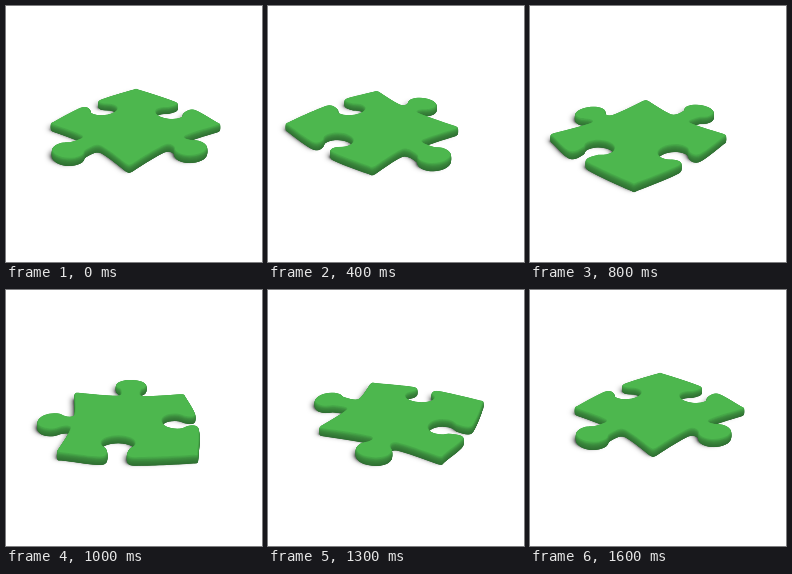
These frames come from a looping animation (256 by 256 pixels, 1.7 s). An HTML page with a canvas:

```html
<!DOCTYPE html>
<html lang="en">
<head>
<meta charset="utf-8">
<title>Turning puzzle piece</title>
<style>
  html, body { margin: 0; width: 100%; height: 100%; overflow: hidden; background: #fff; }
  canvas { display: block; width: 256px; height: 256px; }
</style>
</head>
<body>
<canvas id="stage" width="256" height="256"></canvas>
<script>
const ctx = document.getElementById('stage').getContext('2d');
const STEP = 100, LOOP = 1700, POSES = 16;
const DEPTH = 7.5;

// Sides of the piece on the ground plane (x right, z away), clockwise from back left:
// starting corner, tab (1) or socket (-1), centre of the tab along the side, its reach.
const sides = [
  { from: [-77, 60], sign: 1, shift: -3, reach: 28 },
  { from: [48, 53], sign: 1, shift: 1, reach: 36 },
  { from: [44, -63], sign: -1, shift: -2, reach: 28 },
  { from: [-82, -64], sign: -1, shift: 9, reach: 33 },
];

// One Bezier outline: each entry is [c1, c2, end].
function buildOutline() {
  const curves = [];
  let start;
  sides.forEach(({ from: a, sign, shift, reach }, i) => {
    const b = sides[(i + 1) % 4].from;
    const len = Math.hypot(b[0] - a[0], b[1] - a[1]);
    const u = [(b[0] - a[0]) / len, (b[1] - a[1]) / len];
    const mid = [(a[0] + b[0]) / 2, (a[1] + b[1]) / 2];
    const at = (t, o) => [mid[0] + u[0] * t - u[1] * o * sign, mid[1] + u[1] * t + u[0] * o * sign];
    const e = len / 2 - 4, head = reach - 15;
    // Half a side up to the tip of the tab; dir picks the half.
    const half = dir => [
      [-e * dir, 0], [-len / 3 * dir, -3], [shift - 24 * dir, -6], [shift - 15 * dir, -6],
      [shift - 9 * dir, -6], [shift - 8 * dir, -1], [shift - 11 * dir, head - 9],
      [shift - 13 * dir, head - 6], [shift - 16 * dir, head - 5], [shift - 16 * dir, head + 1],
      [shift - 16 * dir, head + 9], [shift - 9 * dir, reach], [shift, reach],
    ];
    const pts = [...half(1), ...half(-1).reverse().slice(1)].map(p => at(...p));
    if (start) curves.push([a, a, pts[0]]);
    else start = pts[0];
    for (let k = 1; k < pts.length; k += 3) curves.push(pts.slice(k, k + 3));
  });
  const first = sides[0].from;
  curves.push([first, first, start]);
  return { start, curves };
}
const outline = buildOutline();

function trace(angle, drop) {
  const c = Math.cos(angle), s = Math.sin(angle);
  const project = ([x, z]) => {
    const rx = x * c - z * s, rz = x * s + z * c;
    const p = 1 / (1 + rz * 0.00147);
    return [119 + rx * p, 123 + (drop - 0.45 * rz) * p];
  };
  ctx.beginPath();
  ctx.moveTo(...project(outline.start));
  for (const curve of outline.curves) ctx.bezierCurveTo(...curve.flatMap(project));
  ctx.closePath();
}

function castShadow(angle, dx, dy, blur, alpha) {
  ctx.save();
  ctx.shadowColor = `rgba(0,0,0,${alpha})`;
  ctx.shadowBlur = blur;
  ctx.shadowOffsetX = dx;
  ctx.shadowOffsetY = dy;
  trace(angle, DEPTH - 1);
  ctx.fillStyle = '#2f6e33';
  ctx.fill();
  ctx.restore();
}

const low = [46, 108, 49], high = [77, 183, 78];

function draw(pose) {
  const angle = (pose - 6) * 2 * Math.PI / POSES;
  ctx.fillStyle = '#fff';
  ctx.fillRect(0, 0, 256, 256);
  castShadow(angle, -4, -1, 5, 0.5);
  castShadow(angle, -2, 0, 2, 0.5);

  // Stack slices from the floor up; the middle ones swell to round the rim.
  ctx.lineJoin = 'round';
  for (let h = DEPTH; h >= 0; h -= 0.5) {
    const k = 1 - h / DEPTH;
    const mix = 0.5 * k + 0.5 * k ** 5;
    const color = `rgb(${low.map((v, i) => Math.round(v + (high[i] - v) * mix))})`;
    const bulge = 2 * Math.sqrt(Math.max(0, 1 - (2 * k - 1) ** 2));
    trace(angle, h);
    ctx.fillStyle = ctx.strokeStyle = color;
    ctx.fill();
    if (bulge) {
      ctx.lineWidth = bulge;
      ctx.stroke();
    }
  }
}

let shown = -1;
function tick() {
  const pose = Math.floor(performance.now() % LOOP / STEP) % POSES;
  if (pose !== shown) draw(shown = pose);
  requestAnimationFrame(tick);
}
tick();
</script>
</body>
</html>
```
